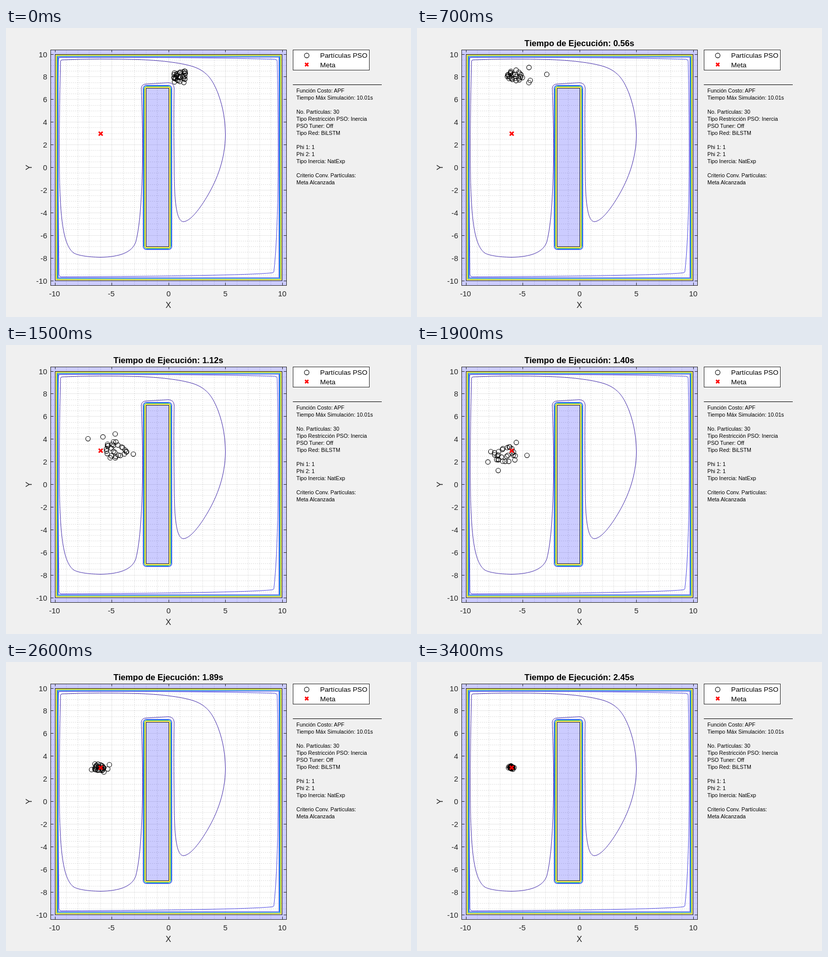
Write an HTML page that moves like this. It is 802 px wide and 573 px high and loops after 3500 ms.

```html
<!DOCTYPE html>
<html lang="es">
<head>
<meta charset="utf-8">
<style>
  html, body { margin: 0; width: 100%; height: 100%; overflow: hidden; background: #f0f0f0; }
  svg { display: block; font-family: "Liberation Sans", Arial, sans-serif; }
</style>
</head>
<body>
<svg id="stage" width="802" height="573" viewBox="0 0 802 573" fill="none"></svg>
<script>
const FRAME_MS = 100, FRAMES = 35, COUNT = 30;
const GOAL = { x: -6, y: 3 };
const INK = '#262626', DARK = '#3e26a8', BLUE = '#4743e2';
const stage = document.getElementById('stage');

function add(tag, attrs, text) {
  const node = document.createElementNS('http://www.w3.org/2000/svg', tag);
  for (const key in attrs) node.setAttribute(key, attrs[key]);
  if (text) node.textContent = text;
  return stage.appendChild(node);
}
const path = (d, stroke, extra) => add('path', { d, stroke, ...extra });
const label = (x, y, size, text, extra) =>
  add('text', { x, y, 'font-size': size, fill: '#000', ...extra }, text);
const box = (l, t, r, b, attrs) =>
  add('rect', { x: l, y: t, width: r - l, height: b - t, ...attrs });
const px = x => 322 + x * 22.5;
const py = y => 276.5 - y * 22.45;
const crisp = v => Math.floor(v) + 0.5;

// Axes and grid
box(88.5, 43.5, 555.5, 510.5, { fill: '#fff' });
let minor = '', major = '', ticks = '';
for (let x = -10; x <= 10; x++) {
  const at = crisp(px(x));
  if (x % 5) minor += `M${at} 43V510`;
  else {
    major += `M${at} 43V510`;
    ticks += `M${at} 510v-5M${at} 43v5`;
  }
}
for (let y = -10; y <= 10; y += 0.5) {
  const at = crisp(py(y));
  if (y % 2) minor += `M89 ${at}H555`;
  else {
    major += `M89 ${at}H555`;
    ticks += `M89 ${at}h5M555 ${at}h-5`;
  }
}
path(minor, '#1a1a1a', { 'stroke-opacity': 0.15, 'stroke-dasharray': '2 2' });
path(major, INK, { 'stroke-opacity': 0.11 });

// Walls and obstacle
add('path', {
  d: 'M89 43H555V510H89ZM97.5 52H547V501H97.5Z',
  fill: '#00f', 'fill-opacity': 0.2, 'fill-rule': 'evenodd'
});
box(277.5, 119.5, 322.5, 433.5, { fill: '#00f', 'fill-opacity': 0.2 });
path(ticks, INK);
box(88.5, 43.5, 555.5, 510.5, { stroke: INK });

// Contour rings: inset from the walls, outset from the obstacle
['#f9e51b', '#a5c93c', '#20b4c4', '#2e87f7', BLUE].forEach((stroke, i) => {
  const gap = 2 + i, style = { stroke, 'stroke-width': i ? 1 : 1.6 };
  box(97.5 + gap, 52 + gap, 546.5 - gap, 501 - gap, style);
  box(277.5 - gap, 119.5 - gap, 322.5 + gap, 433.5 + gap, { ...style, rx: gap });
});
path('M104 62Q104 58.5 108 58.3Q400 58 533 62Q537 62.5 537 66Q543 370 530.5 483' +
  'Q530 485.5 526 485.6Q450 492 109 493.3Q105 493 105 489Q102 200 104 62Z', BLUE);
path('M108 66Q108.5 63.5 111 63.2C160 61 210 61 262 62.5C300 64 345 68 372 77' +
  'C400 87 410 105 420 130C431 160 434 185 434.5 212C434 260 418 300 400 331' +
  'C385 357 365 384 351 384C336 383 333 335 333 270C332.5 220 332 180 333 119' +
  'Q332 109 322 108.5L277 111Q269 111.5 268 119C269 160 271 200 270.5 260' +
  'C269 330 266 390 257 424C250 445 225 454 187 454.5C160 454 143 451 134 446' +
  'C112 430 108 370 106 300C105 220 106 140 108 66Z', DARK);
box(97.5, 52.5, 546.5, 501, { stroke: '#111' });
box(277.5, 119.5, 322.5, 433.5, { stroke: '#111' });

// Labels
const middle = { 'text-anchor': 'middle', fill: INK };
for (let x = -10; x <= 10; x += 5) label(px(x) - (x < 0 ? 1 : 0), 532, 15, String(x), middle);
for (let y = -10; y <= 10; y += 2)
  label(81.5, py(y) + 5.5, 15, String(y), { 'text-anchor': 'end', fill: INK });
label(321.5, 555, 16.5, 'X', middle);
label(0, 0, 16.5, 'Y', { ...middle, transform: 'translate(51 276.5) rotate(-90)' });
const title = label(321.5, 36, 16.6, '', { 'text-anchor': 'middle', 'font-weight': 'bold' });

// Legend and notes
const circle = (cx, cy) => add('circle', { cx, cy, r: 4.6, stroke: '#000', 'stroke-width': 1.1 });
const cross = (x, y, r, width) =>
  path(`M${x - r} ${y - r}l${2 * r} ${2 * r}m0 ${-2 * r}l${-2 * r} ${2 * r}`, '#f00', { 'stroke-width': width });
box(568.5, 43.5, 719.5, 83.5, { fill: '#fff', stroke: INK });
circle(595.5, 54.5);
cross(595.5, 72.5, 3.2, 2.8);
label(622, 59, 13.7, 'Partículas PSO');
label(622, 78, 13.7, 'Meta');
path('M568 112.5H744', '#000');
const notes = [
  'Función Costo: APF', 'Tiempo Máx Simulación: 10.01s', '',
  'No. Partículas: 30', 'Tipo Restricción PSO: Inercia', 'PSO Tuner: Off', 'Tipo Red: BiLSTM', '',
  'Phi 1: 1', 'Phi 2: 1', 'Tipo Inercia: NatExp', '',
  'Criterio Conv. Partículas:', 'Meta Alcanzada'
];
notes.forEach((text, i) => text && label(575, 128 + 14 * i, 10.7, text));

// Swarm
let seed = 11;
function random() {
  seed = (seed * 16807) % 2147483647;
  return seed / 2147483647;
}
const particles = Array.from({ length: COUNT }, (_, i) => ({
  u: random() * 2 - 1,
  v: random() * 2 - 1,
  stray: i % 6 === 0 ? 1.9 : 1,
  lag: i % 6 === 0 ? 1.6 * random() : 0.3 * random()
}));
const bell = (t, peak, width) => Math.exp(-(((t - peak) / width) ** 2));

// Sweep left over the obstacle, then swing around the goal with damping
function centre(t) {
  const turn = 11, swing = 2.7;
  const left = GOAL.x - swing;
  const x = t < turn
    ? 0.97 + (left - 0.97) * (1 - Math.cos(Math.PI * Math.max(0, t) / turn)) / 2
    : GOAL.x - swing * Math.cos(Math.PI * (t - turn) / 4) * Math.exp(-0.2 * (t - turn));
  const drop = 1 / (1 + Math.exp(t - 12));
  return { x, y: GOAL.y + 5.15 * drop - 0.45 * bell(t, 18, 4) };
}

function position({ u, v, stray, lag }, step) {
  const c = centre(step - lag);
  const size = (0.55 + 0.4 * bell(step, 17, 5)) * Math.min(1, (38 - step) / 18);
  const reach = step ? size * Math.hypot(u, v) ** 0.6 * stray : 0.5;
  const angle = Math.atan2(v, u) + 0.35 * step;
  if (!step) return { x: c.x + reach * u, y: c.y + reach * v - 0.15 };
  return {
    x: Math.max(-10, c.x + reach * Math.cos(angle)),
    y: c.y + 0.75 * reach * Math.sin(angle)
  };
}

const dots = particles.map(() => circle(0, 0));
cross(187.5, 209.5, 3.8, 3);

function draw(ms) {
  const step = Math.floor(ms / FRAME_MS) % FRAMES;
  title.textContent = step ? `Tiempo de Ejecución: ${(0.07 * (step + 1)).toFixed(2)}s` : '';
  particles.forEach((particle, i) => {
    const { x, y } = position(particle, step);
    dots[i].setAttribute('cx', px(x));
    dots[i].setAttribute('cy', py(y));
  });
}

const start = performance.now();
function tick() {
  draw(performance.now() - start);
  requestAnimationFrame(tick);
}
tick();
</script>
</body>
</html>
```
